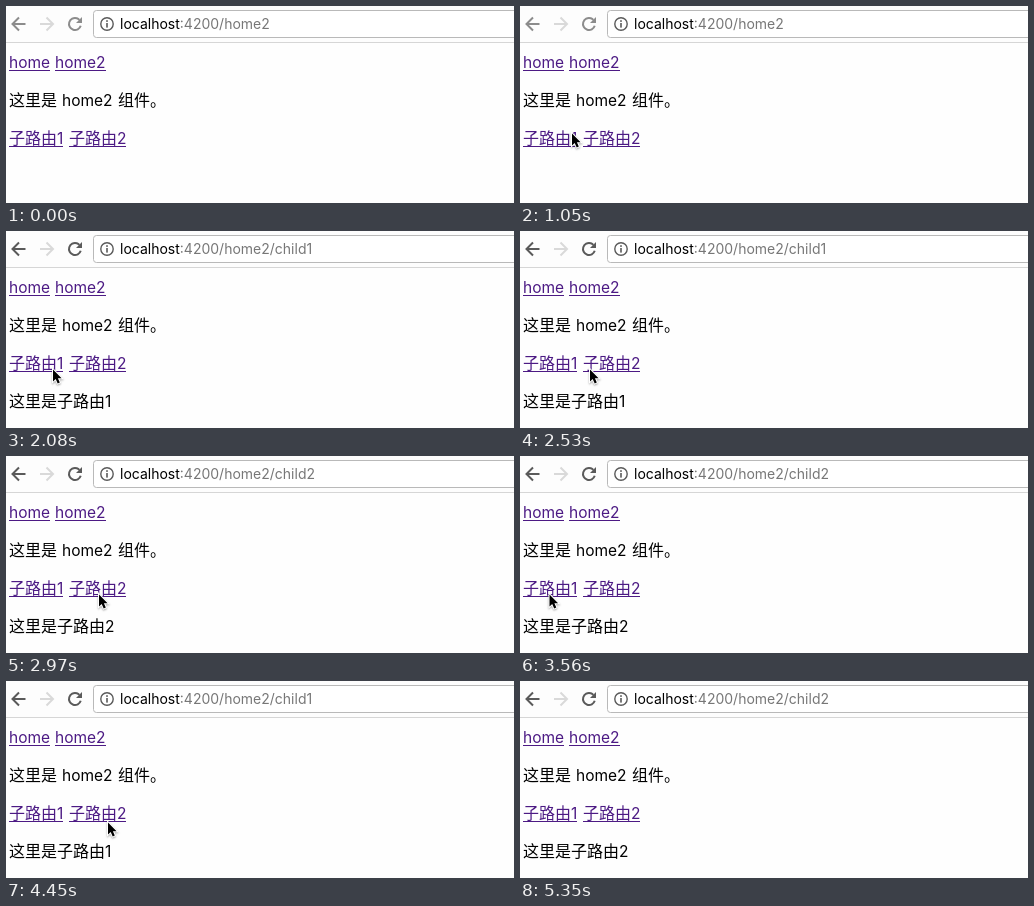
Write an HTML page with a canvas that moves like this. It is 508 by 197 pixels and loops after 5.96 s.

```html
<!DOCTYPE html>
<html lang="zh">
<head>
<meta charset="utf-8">
<title>Child routes</title>
<style>
  html, body { margin: 0; width: 100%; height: 100%; overflow: hidden; background: #fff; }
  canvas { display: block; }
</style>
</head>
<body>
<canvas id="stage" width="508" height="197"></canvas>
<script>
const ctx = document.getElementById('stage').getContext('2d');
const LOOP = 5960;
const TICK = 148.3; // the screen is sampled at this interval, in ms
const LATIN = 'Inter, Roboto, sans-serif';
const CJK = '"Noto Sans CJK SC", "Noto Sans CJK", sans-serif';
const LINK = '#4c1a84';

// Pointer key points, in ticks: it leaves the previous one at `at`
const moves = [
  { at: 2, over: 1, x: 70, y: 89 },
  { at: 4, over: 3, x: 51, y: 126 },
  { at: 7, over: 2, x: 46, y: 130 },
  { at: 11, over: 2, x: 46, y: 137 },
  { at: 15, over: 4, x: 92, y: 137 },
  { at: 20, over: 4, x: 28.5, y: 137 },
  { at: 26, over: 4, x: 101, y: 140 },
  { at: 33, over: 2, x: 118, y: 112 }
];
const clicks = [13, 20, 26, 34];
const FOCUS = 9, ENTER = 2, LEAVE = 36;

const ease = p => p * p * (3 - 2 * p);

function pointerAt(tick) {
  let x = 148, y = 50;
  for (const m of moves) {
    const p = ease(Math.min(1, Math.max(0, (tick - m.at) / m.over)));
    x += (m.x - x) * p;
    y += (m.y - y) * p;
  }
  return [x, y];
}

// Clicks alternate between the two child routes
function childAt(tick) {
  const count = clicks.filter(c => c <= tick).length;
  return count ? String(2 - count % 2) : '';
}

// Draws text and returns where it ends
function text(str, x, y, font, color) {
  ctx.font = font;
  ctx.fillStyle = color;
  ctx.fillText(str, x, y);
  return x + ctx.measureText(str).width;
}
const word = (str, x, y, color = '#000') => text(str, x, y, '15.5px ' + LATIN, color);
const han = (str, x, y, color = '#000') => text(str, x, y, '16px ' + CJK, color);

function underline(x, right, y) {
  ctx.fillStyle = LINK;
  ctx.fillRect(x, y, Math.round(right) - x, 1);
}

function line(points, color) {
  ctx.beginPath();
  points.forEach(([x, y]) => ctx.lineTo(x, y));
  ctx.strokeStyle = color;
  ctx.lineWidth = 2;
  ctx.stroke();
}

function arrow(tip, dir, color) {
  line([[tip + dir, 18], [tip + 14 * dir, 18]], color);
  line([[tip + 7.5 * dir, 11.5], [tip + dir, 18], [tip + 7.5 * dir, 24.5]], color);
}

function reload(color) {
  ctx.beginPath();
  ctx.arc(69, 18, 6, 0.3, -0.75);
  ctx.strokeStyle = color;
  ctx.lineWidth = 2;
  ctx.stroke();
  ctx.beginPath();
  ctx.moveTo(76, 11);
  ctx.lineTo(76, 17);
  ctx.lineTo(70, 17);
  ctx.fillStyle = color;
  ctx.fill();
}

function infoIcon() {
  ctx.beginPath();
  ctx.arc(101, 18, 6.2, 0, Math.PI * 2);
  ctx.strokeStyle = ctx.fillStyle = '#5a5a5a';
  ctx.lineWidth = 1.4;
  ctx.stroke();
  ctx.fillRect(100.2, 14.2, 1.6, 1.7);
  ctx.fillRect(100.2, 17, 1.6, 4.6);
}

function toolbar(active, child) {
  ctx.fillStyle = '#fdfdfd';
  ctx.fillRect(0, 0, 508, 36);
  ctx.fillStyle = '#d6d6d6';
  ctx.fillRect(0, 36, 508, 1);

  const color = active ? '#5a5a5a' : '#8c8c8c';
  arrow(5.5, 1, color);
  arrow(48, -1, '#d9d9d9');
  reload(color);

  ctx.beginPath();
  ctx.roundRect(87.5, 4.5, 440, 27, 3);
  ctx.fillStyle = '#fff';
  ctx.fill();
  ctx.strokeStyle = '#b9b9b9';
  ctx.lineWidth = 1;
  ctx.stroke();
  infoIcon();

  const font = '14px ' + LATIN;
  const end = text('localhost', 114, 23, font, '#000');
  text(':4200/home2' + (child && '/child' + child), end, 23, font, '#777');
}

function page(child) {
  for (const [name, x] of [['home', 3], ['home2', 49]]) {
    underline(x, word(name, x, 62, LINK), 64);
  }

  han('这里是', 3, 100);
  word('home2', 56, 100);
  han('组件。', 112, 100);

  for (const [digit, x] of [['1', 3], ['2', 63]]) {
    const end = han('子路由', x, 138, LINK);
    underline(x, word(digit, end, 138, LINK), 140);
  }

  if (child) word(child, han('这里是子路由', 3, 176), 176);
}

function pointer(x, y) {
  ctx.save();
  ctx.translate(x + 1, y + 1.5);
  ctx.beginPath();
  [[0, 0], [0, 12], [2.7, 9.5], [4.7, 14], [6.8, 13], [4.9, 8.7], [8.6, 8.7]]
    .forEach(([px, py]) => ctx.lineTo(px, py));
  ctx.closePath();
  ctx.shadowColor = 'rgba(0,0,0,.35)';
  ctx.shadowBlur = 2;
  ctx.shadowOffsetY = 1;
  ctx.strokeStyle = '#fff';
  ctx.lineWidth = 2;
  ctx.stroke();
  ctx.shadowColor = 'transparent';
  ctx.fillStyle = '#000';
  ctx.fill();
  ctx.restore();
}

function draw(t) {
  const tick = Math.floor(t / TICK);
  const child = childAt(tick);
  ctx.fillStyle = '#fefefe';
  ctx.fillRect(0, 0, 508, 197);
  toolbar(tick >= FOCUS, child);
  page(child);
  if (tick >= ENTER && tick < LEAVE) pointer(...pointerAt(tick));
}

const start = performance.now();
function frame(now) {
  draw(Math.max(0, now - start) % LOOP);
  requestAnimationFrame(frame);
}
draw(0);
requestAnimationFrame(frame);
</script>
</body>
</html>
```
